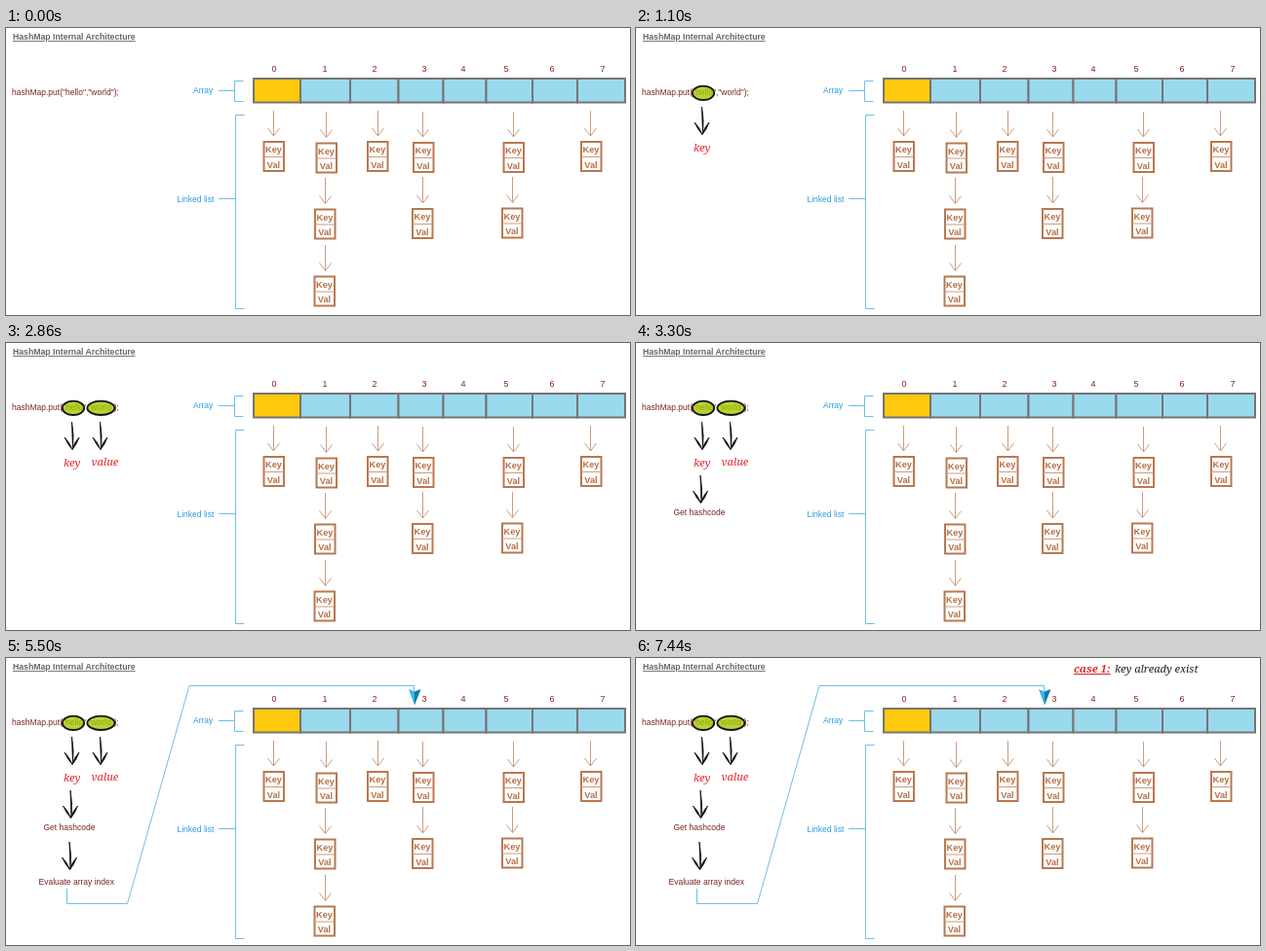
These frames come from a looping animation (640x295 px, 8 s). An HTML page:

```html
<!DOCTYPE html>
<html lang="en">
<head>
<meta charset="utf-8">
<title>HashMap Internal Architecture</title>
<style>
  html, body { margin: 0; width: 100%; height: 100%; overflow: hidden; background: #fff; }
  svg { display: block; width: 100vw; height: 100vh; font: 8.5px "Liberation Sans", Arial, sans-serif; }
  path, rect { fill: none; }
  .title { font-size: 8.7px; font-weight: bold; fill: #666; text-decoration: underline; }
  .code { fill: #7a2424; }
  .num { font-size: 9px; fill: #8a2020; text-anchor: middle; }
  .label { fill: #2b9be0; }
  .line { stroke: #6fbfea; }
  .cell { fill: #9bd9ec; stroke: #757575; stroke-width: 2; }
  .first { fill: #ffc90e; }
  .node { stroke: #b97850; stroke-width: 2; }
  .thin { stroke: #cc9c80; }
  .field { font-size: 9.2px; font-weight: bold; fill: #b56f45; text-anchor: middle; }
  .mark { fill: #a5c800; fill-opacity: .8; stroke: #111; stroke-width: 1.8; }
  .pen { fill: #111; stroke: #111; stroke-width: .8; stroke-linejoin: round; }
  .hand { font: italic 11px "Noto Serif", "Liberation Serif", serif; fill: #e0262c; }
  .case { font-weight: bold; text-decoration: underline; }
  .dark { fill: #222; }
  .bright { fill: #35b6ea; }
  .shade { fill: #1478ab; }
</style>
</head>
<body>
<svg id="stage" viewBox="0 0 640 295" preserveAspectRatio="none"></svg>
<script>
const STEP = 1100, LOOP = 8000;
const stage = document.getElementById('stage');

const text = (x, y, cls, s) => `<text x="${x}" y="${y}" class="${cls}">${s}</text>`;
const path = (d, cls) => `<path d="${d}" class="${cls}"/>`;
const rect = (x, y, w, h, cls) => `<rect x="${x}" y="${y}" width="${w}" height="${h}" class="${cls}"/>`;

const bracket = (x, top, bottom, mid) =>
  path(`M${x + 9} ${top}H${x}V${bottom}H${x + 9}M218 ${mid}H${x}`, 'line');

// A linked-list node with the arrow leading into it
function node(x, y, arrowX, arrowY) {
  const tip = y - 5, mid = x + 11;
  return path(`M${arrowX} ${arrowY}V${tip}m-6 -8l6 8l6 -8`, 'thin') +
    rect(x + 1, y + 1, 20.5, 30, 'node') +
    path(`M${x + 1} ${y + 16.5}h20`, 'thin') +
    text(mid, y + 12, 'field', 'Key') + text(mid, y + 27.5, 'field', 'Val');
}

const highlight = (x, rx) =>
  `<ellipse cx="${x}" cy="66.8" rx="${rx}" ry="7.2" class="mark"/>`;

// Brush-like arrow: tapered shaft and two tapered barbs
const penArrow = (x, y) => path(
  `M${x} ${y}q2.6 14 1 28q-.6 -14 -1 -28` +
  `M${x - 7.5} ${y + 16}q3 7 8 12.5q-3 -8 -8 -12.5` +
  `M${x + 7.5} ${y + 16}q-5 5 -7 12.5q4.5 -5 7 -12.5`, 'pen');

function array() {
  const edges = [254, 302, 353, 402.5, 448.5, 492.5, 540, 586, 635];
  const centers = [275, 327, 378, 429, 469, 513, 560, 612];
  return centers.map((c, i) =>
    rect(edges[i], 52, edges[i + 1] - edges[i], 24.5, i ? 'cell' : 'cell first') +
    text(c, 44.5, 'num', i)).join('');
}

const nodes = [
  [263.5, 116, 274.5, 85], [317.5, 117.5, 328.5, 86], [370, 116, 381.5, 85],
  [417, 117, 427.5, 86], [509.5, 117, 520.5, 86], [589, 116, 599.5, 85],
  [316, 185.5, 327.5, 154], [416, 185, 427.5, 153], [508, 184.5, 519.5, 153],
  [315.5, 254.5, 327.5, 223]
];

const base = text(7, 12, 'title', 'HashMap Internal Architecture') +
  text(6, 69, 'code', 'hashMap.put("hello","world");') +
  text(192, 67, 'label', 'Array') + text(175.5, 179, 'label', 'Linked list') +
  bracket(234.5, 54.5, 75.5, 64.5) + bracket(235.5, 89.5, 288.5, 175.5) +
  array() + nodes.map(n => node(...n)).join('');

const steps = [
  highlight(69, 11.2) + penArrow(67.5, 81) + text(59, 127, 'hand', 'key'),
  highlight(97.4, 14) + penArrow(96.5, 81) + text(87.5, 126, 'hand', 'value'),
  penArrow(66, 136) + text(38.5, 177, 'code', 'Get hashcode'),
  penArrow(65, 189) + text(33.5, 232.5, 'code', 'Evaluate array index'),
  path('M62.5 237V252.5H124.5L188 28.5H418.5V35', 'line') +
    path('M413 32l6 2.5v14z', 'bright') + path('M425.5 32l-6.5 2.5v14z', 'shade'),
  text(449, 15, 'hand case', 'case 1:') + text(491, 15, 'hand dark', 'key already exist')
];

stage.innerHTML = base + steps.map(s => `<g class="step">${s}</g>`).join('');
const groups = stage.querySelectorAll('.step');

function draw(now) {
  const t = now % LOOP;
  groups.forEach((g, i) => g.style.display = t >= (i + 1) * STEP ? '' : 'none');
}

const start = performance.now();
function tick() {
  draw(performance.now() - start);
  requestAnimationFrame(tick);
}
tick();
</script>
</body>
</html>
```
